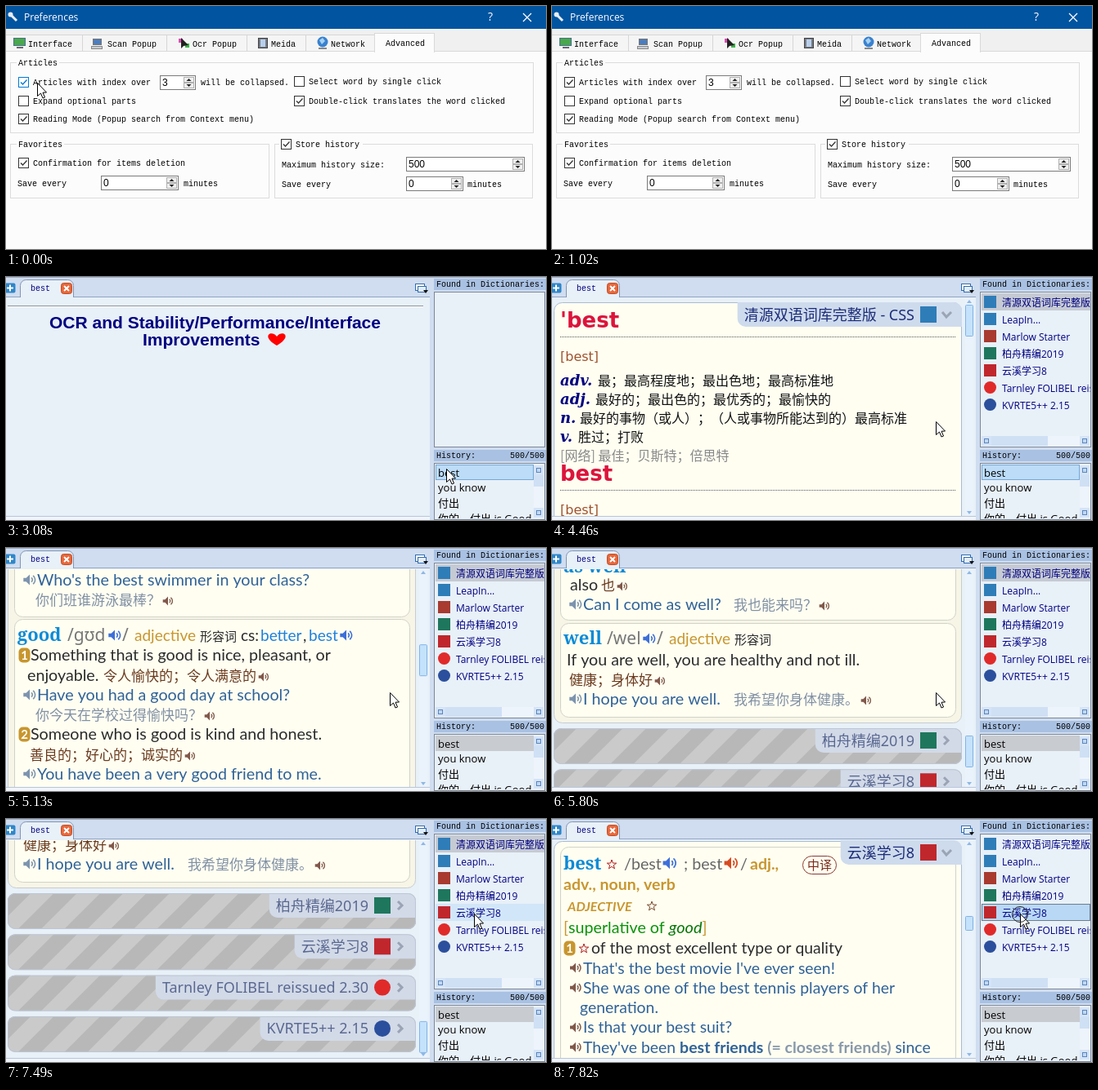
An HTML page with a canvas that plays this animation: 660x298 px, repeating every 8 s.

```html
<!DOCTYPE html>
<html lang="en">
<head>
<meta charset="utf-8">
<title>Dictionary preferences</title>
<style>
html, body { margin: 0; width: 100%; height: 100%; overflow: hidden; }
canvas { display: block; }
</style>
</head>
<body>
<canvas id="stage" width="660" height="298"></canvas>
<script>
const g = document.getElementById('stage').getContext('2d');
const LOOP = 8000;
const CJK = '"Noto Sans CJK SC", "Noto Sans CJK", sans-serif';
const MONO = '10px "Liberation Mono", monospace';
const LIST = '12px "Open Sans", ' + CJK;
const HIST = '13px "Open Sans", ' + CJK;
const LABEL = '18px "Noto Sans", ' + CJK;
const ZH = '17px ' + CJK;
const BODY = '19.7px Lato, ' + CJK;
const BOLD = 'bold 19.5px Lato, sans-serif';
const KIND = '19px Lato, sans-serif';
const HEAD = 'bold 22px "Noto Serif", serif';
const PHON = '21px "Noto Sans", sans-serif';
const INK = '#2b2b2b', BLUE = '#2f6299', GRAY = '#8090a4', BROWN = '#6b3a1e';
const ORANGE = '#c8962e', AZURE = '#0a8ad8', NAVY = '#000080', PAPER = '#fffef1';
const SOUND = '#3d6fdb', EARTH = '#80584a';

const dictionaries = [
  ['清源双语词库完整版', '#2f7db8'],
  ['LeapIn...', '#2f7db8'],
  ['Marlow Starter', '#a83a30'],
  ['柏舟精编2019', '#1e775c'],
  ['云溪学习8', '#c0272d'],
  ['Tarnley FOLIBEL reissued 2.30', '#e02a2a', true],
  ['KVRTE5++ 2.15', '#2b4f9c', true]
];

// [start time, value]: each value holds until the next one
const cursorSteps = [[0, [38, 94]], [340, [101, 105]], [680, [373, 294]], [1020, null],
  [2410, [514, 286]], [2740, [633, 247]], [3080, [538, 235]], [3780, [537, 179]],
  [4120, [511, 167]], [4460, [469, 177]], [6810, [531, 169]], [7150, [566, 135]], [7490, [572, 116]]];
const scrollSteps = [[0, 0], [4800, 300], [5130, 610], [5470, 1020], [5800, 1420], [6140, 1550]];
const at = (steps, t) => steps.reduce((v, s) => t >= s[0] ? s[1] : v, null);

function rect(x, y, w, h, fill, line) {
  if (fill) { g.fillStyle = fill; g.fillRect(x, y, w, h); }
  if (line) { g.strokeStyle = line; g.lineWidth = 1; g.strokeRect(x + .5, y + .5, w - 1, h - 1); }
}
function round(x, y, w, h, r, fill, line) {
  g.beginPath();
  g.roundRect(x + .5, y + .5, w - 1, h - 1, r);
  if (fill) { g.fillStyle = fill; g.fill(); }
  if (line) { g.strokeStyle = line; g.lineWidth = 1; g.stroke(); }
}
function text(s, x, y, font, color = INK, align = 'left') {
  g.font = font;
  g.fillStyle = color;
  g.textAlign = align;
  g.fillText(s, x, y);
}
function path(points, color, width) {
  g.beginPath();
  for (let i = 0; i < points.length; i += 2) g.lineTo(points[i], points[i + 1]);
  if (width) { g.strokeStyle = color; g.lineWidth = width; g.stroke(); }
  else { g.fillStyle = color; g.fill(); }
}
function dotted(draw) {
  g.setLineDash([1, 1]);
  draw();
  g.setLineDash([]);
}
function disc(x, y, r, color) {
  g.beginPath();
  g.arc(x, y, r, 0, 7);
  g.fillStyle = color;
  g.fill();
}
function clipped(shape, draw) {
  g.save();
  g.beginPath();
  shape();
  g.clip();
  draw();
  g.restore();
}
function moved(x, y, draw) {
  g.save();
  g.translate(x, y);
  draw();
  g.restore();
}
function cursor(x, y) {
  moved(x + .5, y + .5, () => {
    g.beginPath();
    [[0, 0], [0, 16], [4, 12.5], [6.5, 18.5], [9, 17.5], [6.5, 11.7], [11, 11.5]].forEach(p => g.lineTo(...p));
    g.closePath();
    g.fillStyle = '#fff';
    g.fill();
    g.strokeStyle = '#000';
    g.lineWidth = 1;
    g.stroke();
  });
}
function icon([, color, circle], x, y, size) {
  if (circle) disc(x + size / 2, y + size / 2, size / 2, color);
  else rect(x, y, size, size, color);
}
function speaker(x, y, color, size = 1) {
  moved(x, y, () => {
    g.scale(size, size);
    path([-7, -2, -4, -2, 0, -6, 0, 6, -4, 2, -7, 2], color);
    for (const r of [3, 6]) {
      g.beginPath();
      g.arc(0, 0, r, -.9, .9);
      g.strokeStyle = color;
      g.lineWidth = 1.5;
      g.stroke();
    }
  });
}
function star(x, y, color) {
  g.beginPath();
  for (let i = 0; i < 10; i++) {
    const r = i % 2 ? 2.4 : 6, a = i * Math.PI / 5;
    g.lineTo(x + r * Math.sin(a), y - r * Math.cos(a));
  }
  g.closePath();
  g.strokeStyle = color;
  g.lineWidth = 1;
  g.stroke();
}

// Preferences dialog
function check(x, y, label, on, color = '#333') {
  rect(x, y, 13, 13, '#fff', color);
  if (on) path([x + 3, y + 6.5, x + 5.5, y + 9, x + 10.5, y + 3.5], color, 1.3);
  text(label, x + 18, y + 10, MONO, '#000');
}
function spin(x, y, w, value) {
  rect(x, y, w, 18, '#fff', '#7a7a7a');
  rect(x + w - 15, y + 2, 13, 7, '#f0f0f0', '#b0b0b0');
  rect(x + w - 15, y + 9, 13, 7, '#f0f0f0', '#b0b0b0');
  const c = x + w - 8.5;
  path([c - 3, y + 7, c, y + 4, c + 3, y + 7], '#222');
  path([c - 3, y + 11, c, y + 14, c + 3, y + 11], '#222');
  text(value, x + 3, y + 13, '12px "Liberation Sans", sans-serif', '#000');
}
function group(x, y, w, h, title) {
  rect(x, y, w, h, null, '#dcdcdc');
  rect(x + 8, y - 2, title.length * 6 + 4, 5, '#fcfcfc');
  text(title, x + 10, y + 4, MONO, '#000');
}
function preferences(t) {
  rect(0, 0, 660, 298, '#fcfcfc');
  rect(0, 0, 660, 28, '#0054a0');
  path([4, 9, 7, 12, 13, 18], '#e8eef4', 3);
  disc(5.5, 10.5, 3, '#e8eef4');
  text('Preferences', 22, 18, '12px "Open Sans", sans-serif', '#fff');
  text('?', 592, 18, '14px "Open Sans", sans-serif', '#fff', 'center');
  path([632, 9, 642, 19], '#fff', 1.2);
  path([642, 9, 632, 19], '#fff', 1.2);
  rect(0, 28, 660, 28, '#f0f0f0');
  const tabs = [[-1, 95, 'Interface', 27], [93, 104, 'Scan Popup', 124], [196, 99, 'Ocr Popup', 228],
    [294, 73, 'Meida', 324], [366, 85, 'Network', 397]];
  for (const [x, w, label, tx] of tabs) {
    rect(x, 35, w, 21, '#f5f5f5', '#d6d6d6');
    text(label, tx, 50, MONO, '#000');
  }
  rect(0, 55, 660, 243, '#fcfcfc');
  rect(0, 55, 660, 1, '#d9d9d9');
  rect(450, 33, 74, 24, '#fcfcfc', '#d9d9d9');
  rect(451, 55, 72, 3, '#fcfcfc');
  text('Advanced', 464, 49, MONO, '#000');
  rect(9, 39, 15, 10, '#49a84a', '#4a6f96');
  rect(13, 50, 8, 2, '#667');
  rect(106, 40, 11, 8, '#4d7dbb', '#777');
  rect(104, 49, 14, 4, '#c5ccd4', '#888');
  rect(211, 40, 5, 5, '#dd4eb4');
  rect(219, 46, 5, 5, '#3fb44b');
  path([214, 39, 214, 52, 217, 49, 223, 48], '#222');
  rect(308, 39, 12, 13, '#777b85', '#444');
  rect(311, 41, 6, 9, '#b8d0ec');
  disc(387, 44, 6.5, '#3a82d0');
  path([383, 42, 387, 39, 390, 43, 386, 47], '#a8d2f0');
  rect(382, 51, 10, 2, '#888');

  group(5, 69, 640, 87, 'Articles');
  check(15, 87, 'Articles with index over', true, t < 680 ? '#0078d7' : '#333');
  spin(188, 85, 44, '3');
  text('will be collapsed.', 238, 97, MONO, '#000');
  check(352, 86, 'Select word by single click', false);
  check(15, 110, 'Expand optional parts', false);
  check(352, 110, 'Double-click translates the word clicked', true);
  check(15, 132, 'Reading Mode (Popup search from Context menu)', true);
  group(5, 169, 317, 67, 'Favorites');
  check(15, 186, 'Confirmation for items deletion', true);
  text('Save every', 14, 221, MONO, '#000');
  spin(116, 208, 95, '0');
  text('minutes', 217, 221, MONO, '#000');
  rect(328, 169, 316, 67, null, '#dcdcdc');
  rect(334, 162, 102, 15, '#fcfcfc');
  check(336, 163, 'Store history', true);
  text('Maximum history size:', 337, 198, MONO, '#000');
  spin(489, 185, 145, '500');
  text('Save every', 337, 222, MONO, '#000');
  spin(489, 209, 70, '0');
  text('minutes', 564, 222, MONO, '#000');
}

// Main window
function chrome(t) {
  const named = t >= 3080, w = named ? 66 : 90;
  rect(0, 0, 660, 298, '#d0ddf0');
  rect(0, 0, 660, 1, '#9db0cc');
  rect(0, 24, 518, 274, '#e8f0f8');
  rect(0, 24, 518, 1, '#8fa4c4');
  round(-2, 7, 14, 13, 2, '#2f86c8');
  path([1, 13.5, 9, 13.5], '#fff', 2);
  path([5, 9.5, 5, 17.5], '#fff', 2);
  round(17, 3, w, 30, 7, '#e8f0f8', '#8294b4');
  rect(10, 25, 110, 9, '#e8f0f8');
  text(named ? 'best' : '(untitled)', named ? 30 : 23, 17, MONO, NAVY);
  const cx = named ? 67 : 87;
  round(cx, 7, 14, 14, 3, '#e8683c', '#c04e26');
  path([cx + 4, 11, cx + 10, 17], '#fff', 2);
  path([cx + 10, 11, cx + 4, 17], '#fff', 2);
  rect(500, 8, 12, 9, '#fff', '#2f6cb0');
  rect(503, 11, 11, 8, '#e4eefa', '#2f6cb0');
  path([510, 16, 516, 16, 513, 20], '#111');
  rect(0, 293, 518, 1, '#b8c6da');
  rect(0, 294, 518, 4, '#f0f5fb');
}
function button(x, y) {
  rect(x, y, 12, 12, '#d5e4f7');
  rect(x + 3, y + 3, 6, 6, '#c2d8f2', '#5b86bd');
}
function sidebar(t) {
  rect(523, 2, 137, 14, '#a9c1e2');
  text('Found in Dictionaries:', 526, 12, MONO, '#000');
  rect(523, 18, 136, 191, '#e8f0f8', '#7c8797');
  if (t >= 3420) clipped(() => g.rect(525, 19, 133, 188), () => {
    const picked = t >= 7820 ? 4 : 0;
    const hover = t >= 7490 ? 4 : t >= 7150 ? 5 : -1;
    dictionaries.forEach((d, i) => {
      const y = 20 + i * 21;
      if (i === picked) {
        rect(525, y, 133, 21, i ? '#b8d8f6' : '#c5cad3');
        if (i) dotted(() => rect(525, y, 133, 21, null, '#222'));
      } else if (i === hover) rect(525, y, 133, 21, '#d2e6f9');
      icon(d, 528, y + 3, 15);
      text(d[0], 550, y + 15.5, LIST, NAVY);
    });
    rect(525, 195, 133, 12, '#eef4fb');
    button(525, 195);
    rect(537, 195, 69, 12, '#cfe0f5');
    button(645, 195);
  });
  rect(523, 212, 137, 14, '#a9c1e2');
  text('History:', 526, 222, MONO, '#000');
  text('500/500', 658, 222, MONO, '#000', 'right');
  rect(523, 228, 136, 70, '#e8f0f8', '#7c8797');
  clipped(() => g.rect(524, 229, 134, 67), () => {
    const focus = t >= 3080 && t < 4800;
    rect(525, 230, 120, 19, focus ? '#bcdcf8' : '#c8cbd0', focus ? '#78a8d4' : null);
    ['best', 'you know', '付出', '你的，付出 is Good'].forEach((s, i) => text(s, 528, 244.5 + i * 18.7, HIST, '#000'));
    rect(645, 230, 13, 66, '#eef4fb');
    button(645, 231);
    rect(645, 243, 12, 14, '#cfe0f5');
    button(645, 283);
  });
}
function welcome() {
  rect(2, 35, 508, 1, '#8c94a0');
  rect(2, 36, 508, 1, '#fff');
  const font = 'bold 21px "Liberation Sans", sans-serif';
  text('OCR and Stability/Performance/Interface', 255.5, 63, font, NAVY, 'center');
  text('Improvements', 167, 84, font, NAVY);
  g.beginPath();
  g.moveTo(331, 84);
  g.bezierCurveTo(311, 73, 324, 64, 331, 73);
  g.bezierCurveTo(338, 64, 351, 73, 331, 84);
  g.fillStyle = '#f00';
  g.fill();
}
function tag(dict, y, open, suffix = '') {
  const label = dict[0] + suffix;
  g.font = LABEL;
  const x = 443 - g.measureText(label).width;
  g.beginPath();
  g.roundRect(x - 8, y, 509 - x, 30, [0, 10, 0, 10]);
  g.fillStyle = open ? '#cedbed' : '#d2dae8';
  g.fill();
  text(label, 443, y + 21.5, LABEL, open ? '#1c2c78' : '#5a6890', 'right');
  icon(dict, 450, y + 5, 20);
  const c = y + 15;
  path(open ? [477, c - 3, 482, c + 3, 488, c - 3] : [479, c - 5, 484, c, 479, c + 5], '#9aa4b4', 3);
}
function collapsed(dict, y) {
  const band = 20 * Math.SQRT2, h = 44;
  clipped(() => g.roundRect(2, y, 499, h, 9), () => {
    rect(2, y, 499, h, '#cacaca');
    for (let x = 2; x < 550; x += 2 * band) path([x, y, x + band, y, x + band - h, y + h, x - h, y + h], '#b8b8b8');
    tag(dict, y, false);
  });
  round(2, y, 499, h, 9, null, '#bcc6d6');
}
function brief(y, word) {
  text(word, 10, y, 'bold 26px "DejaVu Sans", sans-serif', '#dc143c');
  dotted(() => path([10, y + 11.5, 494, y + 11.5], '#555', 1));
  text('[best]', 10, y + 41, '16px "DejaVu Sans", sans-serif', '#a0522d');
  const senses = [['adv.', 56, '最；最高程度地；最出色地；最高标准地'], ['adj.', 53, '最好的；最出色的；最优秀的；最愉快的'],
    ['n.', 34, '最好的事物（或人）；（人或事物所能达到的）最高标准'], ['v.', 32, '胜过；打败']];
  const font = '16px ' + CJK;
  senses.forEach(([pos, x, meaning], i) => {
    text(pos, 10, y + 71 + i * 23, 'italic bold 18px "DejaVu Serif", serif', NAVY);
    text(meaning, x, y + 71 + i * 23, font, '#111');
  });
  text('[网络] 最佳；贝斯特；倍思特', 10, y + 163, font, '#888');
}
function panel(y, end) {
  round(10, y, 484, end - y, 10, PAPER, '#d2d2c8');
}
function headword(y, word, sound, kind = 'adjective', zh = '形容词', wide = false) {
  text(word, 14, y, HEAD, AZURE);
  const d = wide ? 14 : 0;
  text('/' + sound, wide ? 75 : 67, y, PHON, '#777');
  speaker(119 + d, y - 7, SOUND, 1.1);
  text('/', 128 + d, y, PHON, '#777');
  text(kind, 143 + d, y, KIND, ORANGE);
  text(zh, 223 + d, y, '15px ' + CJK, INK);
}
function badge(n, x, y) {
  round(x, y - 16, 15, 19, 5, '#c8962e');
  text(n, x + 7.5, y - 1, 'bold 15px Lato, sans-serif', '#fff', 'center');
}
function zhLine(s, x, y, color = BROWN) {
  text(s, x, y, ZH, color);
  speaker(x + g.measureText(s).width + 9, y - 5, EARTH, .9);
}
function example(y, s, color = '#7d94ae') {
  speaker(29, y - 7, color, 1.1);
  text(s, 38, y, BODY, BLUE);
}
function sense(n, y, meaning, zh, sample, sampleZh) {
  badge(n, 15, y);
  text(meaning, 30, y, BODY);
  zhLine(zh, 29, y + 25);
  example(y + 49, sample);
  zhLine(sampleZh, 36, y + 73, GRAY);
}
function dictionaryPage() {
  round(2, 31, 499, 394, 10, PAPER, '#a9bcd6');
  tag(dictionaries[0], 31, true, ' - CSS');
  brief(62, "'best");
  brief(250, 'best');
  collapsed(dictionaries[1], 432);
  round(2, 482, 499, 1153, 10, '#f7f5e6', '#c6ccd2');
  tag(dictionaries[2], 482, true);
  panel(514, 695);
  headword(536, 'best', 'best');
  sense(1, 559, 'Better than all others.', '最好的；最佳的', 'This is my best dress.', '这是我最好的连衣裙。');
  example(656, "Who's the best swimmer in your class?");
  zhLine('你们班谁游泳最棒？', 36, 680, GRAY);
  panel(697, 958);
  headword(724, 'good', 'gʊd', 'adjective', '形容词', true);
  text('cs:', 287, 724, KIND);
  text('better', 311, 724, KIND, '#1e80e0');
  text(',', 363, 724, KIND);
  text('best', 370, 724, KIND, '#1e80e0');
  speaker(416, 717, SOUND, 1.1);
  badge(1, 15, 748);
  text('Something that is good is nice, pleasant, or', 30, 748, BODY);
  text('enjoyable.', 26, 773, BODY);
  zhLine('令人愉快的；令人满意的', 119, 773);
  example(797, 'Have you had a good day at school?');
  zhLine('你今天在学校过得愉快吗？', 36, 821, GRAY);
  sense(2, 845, 'Someone who is good is kind and honest.', '善良的；好心的；诚实的',
    'You have been a very good friend to me.', '你一直是我很好的朋友。');
  panel(963, 1509);
  headword(990, 'well', 'wel', 'adverb', '副词');
  const uses = [['In a good way.', '好地；令人满意地', 'She sings very well.', '她唱歌唱得很好。'],
    ['In a complete way.', '完全地；充分地', 'Shake the bottle well.', '把瓶子好好摇一摇。'],
    ['Very much.', '很；相当', 'I know him well.', '我很了解他。'],
    ['In a kind way.', '友好地', 'They treat us well.', '他们对我们很好。']];
  uses.forEach((u, i) => sense(i + 1, 1018 + i * 98, ...u));
  text('as well', 14, 1450, HEAD, AZURE);
  text('also', 22, 1472, BODY);
  zhLine('也', 60, 1472);
  example(1496, 'Can I come as well?');
  zhLine('我也能来吗？', 222, 1496, GRAY);
  panel(1512, 1628);
  headword(1538, 'well', 'wel');
  text('If you are well, you are healthy and not ill.', 18, 1564, BODY);
  zhLine('健康；身体好', 21, 1588);
  example(1612, 'I hope you are well.');
  zhLine('我希望你身体健康。', 222, 1612, GRAY);
  dictionaries.slice(3).forEach((d, i) => collapsed(d, 1641 + i * 50.3));
}
function learnerPage() {
  round(2, 27, 499, 320, 10, PAPER, '#a9bcd6');
  panel(34, 340);
  tag(dictionaries[4], 26, true);
  text('best', 14, 62, HEAD, AZURE);
  star(73, 56, '#b02020');
  text('/best', 88, 62, BODY, '#666');
  speaker(144, 54, SOUND, 1.2);
  text('; best', 161, 62, BODY, '#666');
  speaker(219, 54, '#d84a20', 1.2);
  text('/', 230, 62, BODY, '#666');
  text('adj.,', 242, 62, BOLD, ORANGE);
  round(306, 45, 42, 23, 11, null, '#8b3a2a');
  text('中译', 327, 62, '15px ' + CJK, '#7a2a1a', 'center');
  text('adv., noun, verb', 14, 86.5, BOLD, ORANGE);
  text('ADJECTIVE', 19, 113, 'italic bold 16px Lato, sans-serif', ORANGE);
  star(122, 107, '#7a4a2a');
  text('[', 14, 140, BODY, ORANGE);
  text('superlative of ', 20, 140, BODY, '#0a930a');
  const x = 20 + g.measureText('superlative of ').width;
  text('good', x, 140, 'italic 20px Lato, sans-serif', '#087808');
  text(']', x + g.measureText('good').width, 140, BODY, ORANGE);
  badge(1, 14, 165);
  star(39, 159, '#b02020');
  const font = '19.4px Lato, sans-serif';
  text('of the most excellent type or quality', 48, 165, font);
  const lines = ["That's the best movie I've ever seen!", 'She was one of the best tennis players of her',
    'generation.', 'Is that your best suit?', "They've been "];
  lines.forEach((s, i) => {
    const y = 189.5 + i * 24.3, wrapped = i === 2;
    if (!wrapped) speaker(29, y - 7, EARTH);
    text(s, wrapped ? 34 : 38, y, font, BLUE);
  });
  let px = 38 + g.measureText("They've been ").width;
  for (const [s, f, color] of [['best friends ', BOLD, BLUE], ['(= closest friends) ', BOLD, '#8798aa'], ['since', font, BLUE]]) {
    text(s, px, 286.5, f, color);
    px += g.measureText(s).width;
  }
}
function article(t) {
  const late = t >= 7820, scroll = at(scrollSteps, t);
  clipped(() => g.rect(0, 26, 504, 267), () => late ? learnerPage() : moved(0, -scroll, dictionaryPage));
  rect(505, 26, 10, 267, '#eaf2fb');
  path([507, 32, 510, 28, 513, 32], '#8fb8e4');
  path([507, 287, 510, 291, 513, 287], '#8fb8e4');
  round(505, late ? 119 : 34 + scroll * .138, 10, late ? 18 : 39, 1, '#c4e2fb', '#80b4e6');
}
function mainWindow(t) {
  chrome(t);
  if (t < 3420) welcome();
  else article(t);
  sidebar(t);
}
function draw() {
  const t = performance.now() % LOOP;
  if (t < 2060) preferences(t);
  else mainWindow(t);
  const point = at(cursorSteps, t);
  if (point) cursor(...point);
  if (t >= 7820) {
    g.beginPath();
    g.arc(572, 117, 9.5, 0, 7);
    g.strokeStyle = '#222';
    g.lineWidth = 1;
    g.stroke();
  }
  requestAnimationFrame(draw);
}
draw();
</script>
</body>
</html>
```
